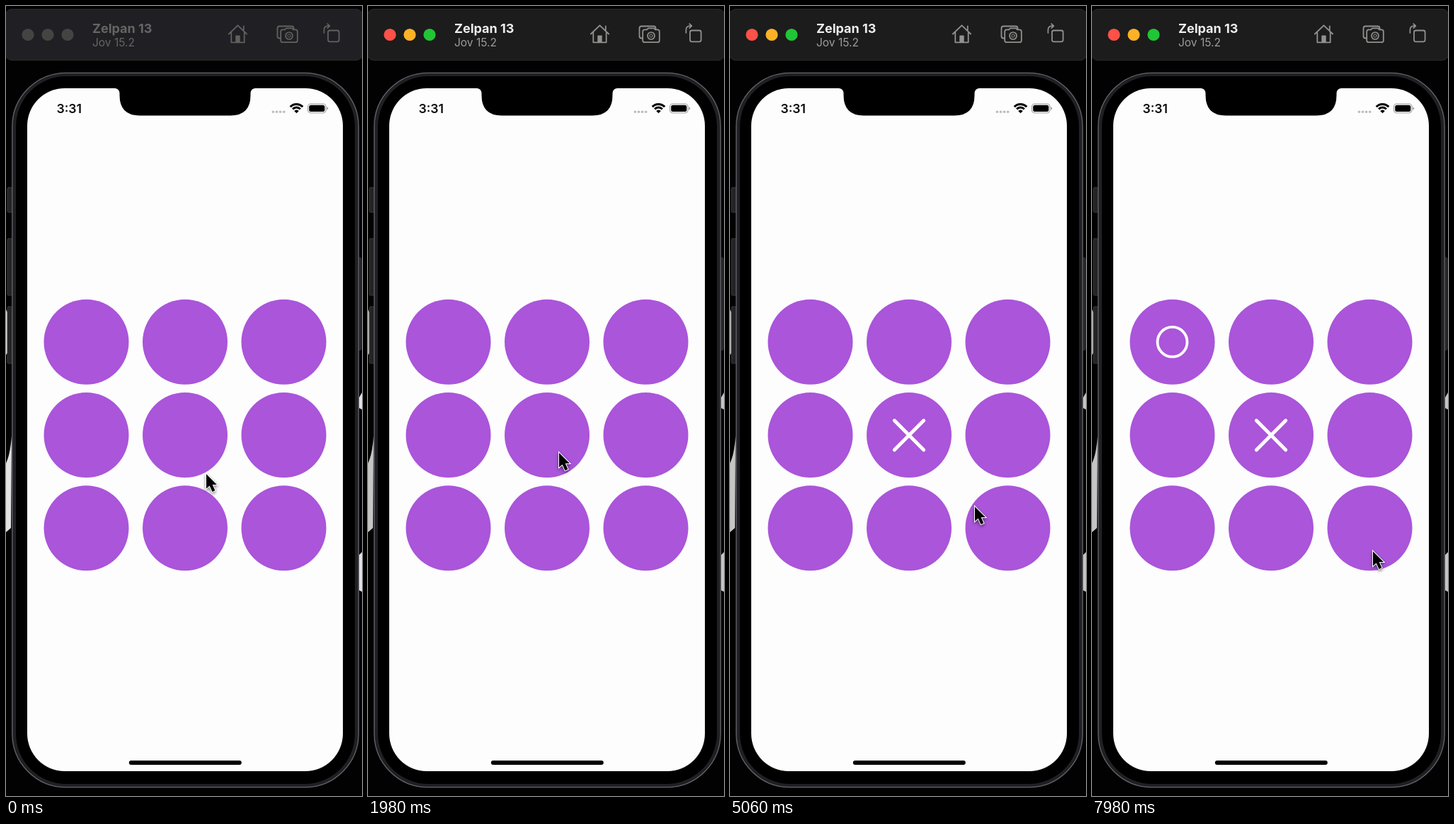
An HTML page with a canvas that plays this animation: 503x1114 px, repeating every 8000 ms.

```html
<!DOCTYPE html>
<html lang="en">
<head>
<meta charset="utf-8">
<title>Noughts and crosses</title>
<style>
  html, body { margin: 0; width: 100%; height: 100%; overflow: hidden; background: #000; }
  canvas { display: block; width: 503px; height: 1114px; }
</style>
</head>
<body>
<canvas id="stage" width="503" height="1114"></canvas>
<script>
const ctx = document.getElementById('stage').getContext('2d');
const LOOP = 8000, ACTIVE_AT = 1680, CROSS_AT = 2340, RING_AT = 6900;
const COLS = [113.5, 253, 392.5], ROWS = [473.7, 605, 736.2];
const FONT = 'Inter, "Liberation Sans", sans-serif';

// Pointer stops: time, x, y
const STOPS = [
  [0, 283, 660], [60, 283, 660], [500, 267, 620], [900, 267, 620],
  [1500, 270, 630], [2420, 270, 630], [2820, 306, 673], [3360, 346, 706],
  [7020, 346, 706], [7800, 397, 769], [LOOP, 397, 769]
];

function pointerAt(t) {
  const i = STOPS.findIndex(s => s[0] > t);
  const [t0, x0, y0] = STOPS[i - 1], [t1, x1, y1] = STOPS[i];
  const u = (t - t0) / (t1 - t0), e = u * u * (3 - 2 * u);
  return [x0 + (x1 - x0) * e, y0 + (y1 - y0) * e];
}

function box(x, y, w, h, r, fill, stroke, lw = 1) {
  ctx.beginPath();
  ctx.roundRect(x, y, w, h, r);
  paint(fill, stroke, lw);
}

function disc(x, y, r, fill, stroke, lw = 1) {
  ctx.beginPath();
  ctx.arc(x, y, r, 0, Math.PI * 2);
  paint(fill, stroke, lw);
}

function shape(d, fill, stroke, lw = 1) {
  const p = new Path2D(d);
  if (fill) { ctx.fillStyle = fill; ctx.fill(p); }
  if (stroke) { ctx.strokeStyle = stroke; ctx.lineWidth = lw; ctx.stroke(p); }
}

function paint(fill, stroke, lw) {
  if (fill) { ctx.fillStyle = fill; ctx.fill(); }
  if (stroke) { ctx.strokeStyle = stroke; ctx.lineWidth = lw; ctx.stroke(); }
}

function text(str, x, y, weight, size, color) {
  ctx.font = `${weight} ${size}px ${FONT}`;
  ctx.fillStyle = color;
  ctx.fillText(str, x, y);
}

function backdrop(active) {
  ctx.fillStyle = '#020202';
  ctx.fillRect(0, 0, 503, 1114);
  const light = active ? '#c5c5c5' : '#e2e2e2';
  shape('M0 428 L3 434 V488 L0 492 Z', light);
  shape('M8 606 C6 632 2 640 0 645 V742 L7 736 Z', light);
  shape('M499 552 L503 545 V569 L499 567 Z', light);
  shape('M499 774 L503 770 V826 L499 824 Z', light);
}

function toolbar(active) {
  box(-1, 4.5, 505, 72, 9, active ? '#1c1c1c' : '#202024', active ? '#2b2b29' : '#29292b');
  const lights = active ? ['#fe5148', '#fdb127', '#20c636'] : Array(3).fill('#454443');
  lights.forEach((c, i) => disc(31 + 28 * i, 40.5, 8.6, c));
  text('Zelpan 13', 122, 37.5, 700, 18, active ? '#eeeeee' : '#656565');
  text('Jov 15.2', 122, 57, 400, 15.5, active ? '#9c9c9c' : '#656565');

  const ink = active ? '#91918f' : '#61615f', bg = active ? '#1c1c1c' : '#202024';
  ctx.lineCap = ctx.lineJoin = 'round';
  shape('M314.8 39.5 L327.5 27.3 L340.2 39.5 M335.8 34 V28.5 M318.3 37.5 V51.3 H336.7 V37.5', null, ink, 1.8);
  box(324.3, 41.5, 6.4, 9.5, 0.5, ink);

  box(383.5, 28.5, 23, 17, 3, null, ink, 1.8);
  shape('M390 33.4 H394 L396 31.4 H404 L406 33.4 H409 Q411.8 33.4 411.8 36.2 V48.4 Q411.8 51.2 409 51.2 H391 Q388.2 51.2 388.2 48.4 V36.2 Q388.2 33.4 391 33.4 Z', bg, ink, 1.8);
  disc(400, 42, 5, null, ink, 1.7);
  disc(400, 42, 2.2, null, ink, 1);

  box(455, 34.5, 15.6, 15.8, 2.5, null, ink, 1.8);
  shape('M449.4 38 V34 Q449.4 28.2 455 28.2 H457 M454.2 25.2 L457.4 28.2 L454.2 31.2', null, ink, 1.7);
}

function phone() {
  const side = '#242426', edge = '#39393a';
  [[256, 35], [328, 80], [424, 80]].forEach(([y, h]) => box(2, y, 8, h, 1.5, side, edge));
  box(496, 355, 6, 130, 1.5, side, edge);
  box(8.8, 94.3, 489.4, 1007.4, 76, '#202024', '#65656a', 1.3);
  box(14, 99, 479, 998, 71, '#000');
  box(30, 116, 446, 963, 53, '#fdfdfd');
  shape('M154 115.5 H352 V116 Q345.5 116.5 345.5 124 V126 Q345.5 154.5 317 154.5 H189 Q160.5 154.5 160.5 126 V124 Q160.5 116.5 154 116 Z', '#000');

  text('3:31', 71.5, 151, 600, 17.6, '#0b0b0d');
  for (let i = 0; i < 4; i++) disc(377.4 + 5.1 * i, 149.3, 1.8, '#bcbcc0');

  ctx.lineCap = 'butt';
  [[12.2, 3], [7.5, 3]].forEach(([r, lw]) => {
    ctx.beginPath();
    ctx.arc(410.5, 150.6, r, -Math.PI * 0.755, -Math.PI * 0.245);
    paint(null, '#000', lw);
  });
  shape('M410.5 151.2 L407.2 147.9 Q410.5 144.9 413.8 147.9 Z', '#000');

  box(426.5, 138, 25.5, 12.8, 4, null, '#9b9b9d', 1.1);
  box(428.2, 139.7, 22.1, 9.4, 2.5, '#000');
  shape('M453.3 142.3 Q455.2 142.9 455.2 144.4 Q455.2 145.9 453.3 146.5 Z', '#9b9b9d');
  box(173.8, 1064, 159, 6, 3, '#000');
}

function board(t) {
  for (const y of ROWS) for (const x of COLS) disc(x, y, 60, '#aa55da');
  ctx.lineCap = 'round';
  if (t >= CROSS_AT) shape('M232.3 584.5 L273.7 625.9 M273.7 584.5 L232.3 625.9', null, '#fff', 4.9);
  if (t >= RING_AT) disc(COLS[0], ROWS[0], 21, null, '#fff', 3.8);
}

function pointer(x, y) {
  ctx.save();
  ctx.translate(x, y);
  ctx.shadowColor = 'rgba(0,0,0,.4)';
  ctx.shadowBlur = 4;
  ctx.shadowOffsetY = 2;
  const d = 'M0 0 V20.6 L4.7 16.4 L8.5 25 L12.4 23.3 L8.7 14.9 H15 Z';
  ctx.lineJoin = 'miter';
  shape(d, '#fff', '#fff', 2);
  ctx.shadowColor = 'transparent';
  shape(d, '#000');
  ctx.restore();
}

function draw(now) {
  const t = now % LOOP, active = t >= ACTIVE_AT;
  backdrop(active);
  toolbar(active);
  phone();
  board(t);
  pointer(...pointerAt(t));
}

const start = performance.now();
function tick() {
  draw(performance.now() - start);
  requestAnimationFrame(tick);
}
tick();
</script>
</body>
</html>
```
